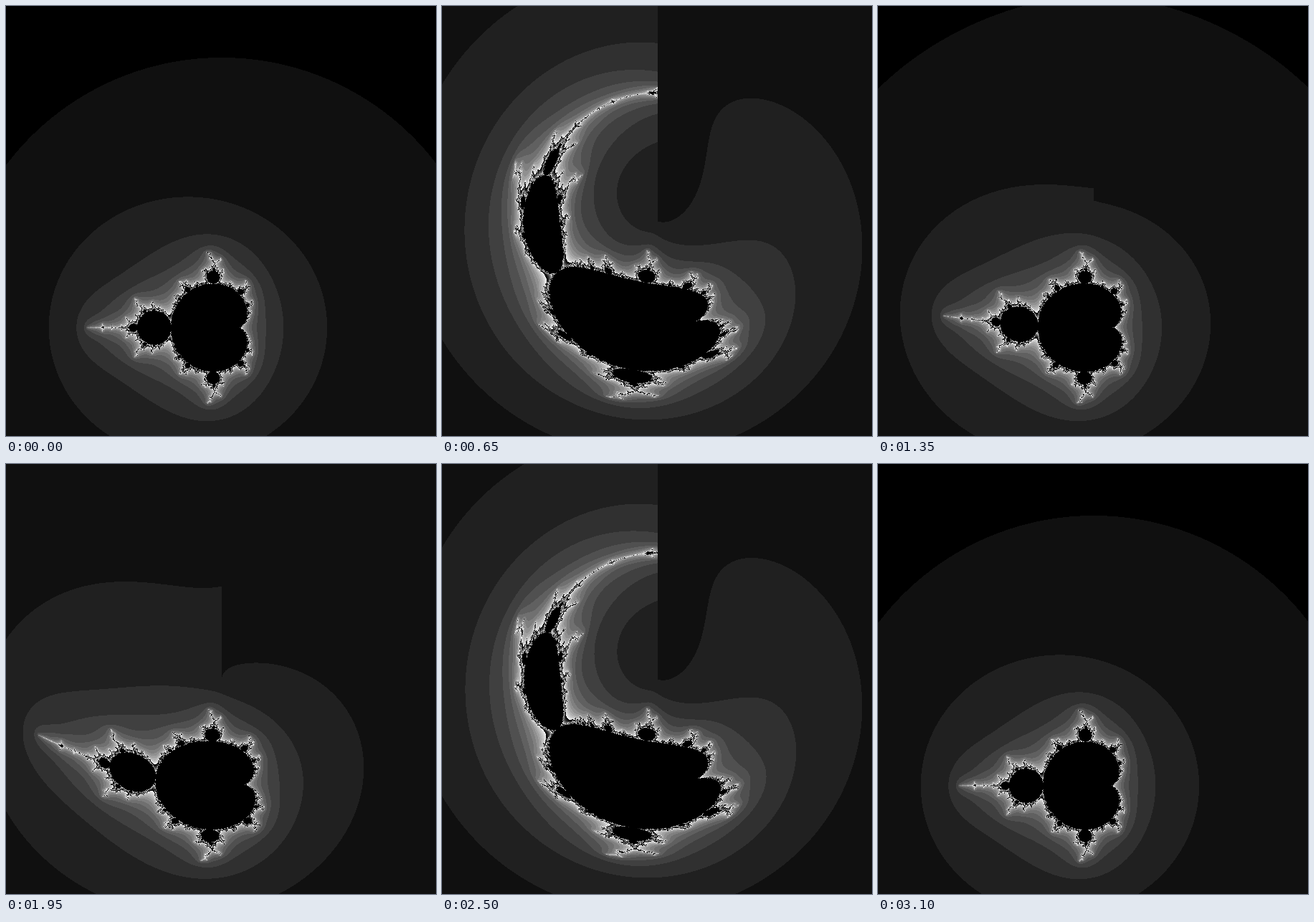
Write an HTML page with a canvas that moves like this. It is 600 px wide and 600 px high and loops after 3.15 s.

```html
<!DOCTYPE html>
<html lang="en">
<head>
<meta charset="utf-8">
<title>Mandelbrot set bending into polar coordinates</title>
<style>
  html, body { margin: 0; width: 100%; height: 100%; overflow: hidden; background: #000; }
  canvas { display: block; width: 600px; height: 600px; }
</style>
</head>
<body>
<canvas id="stage" width="600" height="600"></canvas>
<script>
const SIZE = 600;
const CX = 300.5, CY = 300;      // pole of the polar grid
const SCALE = 94.2;              // pixels per unit of the complex plane
const DROP = 148.3;              // real axis lies this far below the pole
const TURN = 58.2;               // pixels of arc length per radian
const LIMIT = 256, BAILOUT = 16; // iterations, squared escape radius
const STEP = 50, STEPS = 63, CYCLE = 31;
const HOLD = 2, RISE = 13.9, FALL = 15;

const ctx = document.getElementById('stage').getContext('2d');
const image = ctx.createImageData(SIZE, SIZE);
const pixels = new Uint32Array(image.data.buffer);

// Polar coordinates of each pixel; the angle is measured from straight down.
const radius = new Float32Array(SIZE * SIZE);
const angle = new Float32Array(SIZE * SIZE);
for (let y = 0, i = 0; y < SIZE; y++) {
  for (let x = 0; x < SIZE; x++, i++) {
    radius[i] = Math.hypot(x - CX, y - CY);
    angle[i] = Math.atan2(x - CX, y - CY);
  }
}

// Sixteen greys that repeat as the count grows.
const shades = Array.from({ length: LIMIT + 1 }, (_, k) => {
  const v = k * 16 % 256;
  return (0xff000000 | v << 16 | v << 8 | v) >>> 0;
});

// The main cardioid and the disc beside it never escape.
function inBody(a, b) {
  const bb = b * b, p = a - 0.25, q = p * p + bb;
  return q * (q + p) < bb / 4 || (a + 1) * (a + 1) + bb < 1 / 16;
}

function escapeCount(a, b) {
  if (inBody(a, b)) return LIMIT;
  let x = a, y = b, k = 0;
  while (k < LIMIT) {
    const xx = x * x, yy = y * y;
    if (xx + yy > BAILOUT) break;
    y = 2 * x * y + b;
    x = xx - yy + a;
    k++;
  }
  return k;
}

const easeInOut = x => x < 0.5 ? 2 * x * x : 1 - 2 * (1 - x) * (1 - x);

// 0 is the flat plane, 1 is fully polar.
function bendAt(step) {
  const n = step % CYCLE;
  const phase = Math.min((n - HOLD) / RISE, (CYCLE - n) / FALL, 1);
  return easeInOut(Math.max(0, phase));
}

function draw(bend) {
  const flat = 1 - bend;
  for (let y = 0, i = 0; y < SIZE; y++) {
    for (let x = 0; x < SIZE; x++, i++) {
      const u = flat * (x - CX) + bend * TURN * angle[i];
      const v = flat * (y - CY) + bend * radius[i];
      pixels[i] = shades[escapeCount(u / SCALE, (v - DROP) / SCALE)];
    }
  }
  ctx.putImageData(image, 0, 0);
}

const start = performance.now();
let shown = -1;

function tick() {
  const step = Math.floor((performance.now() - start) / STEP) % STEPS;
  const bend = bendAt(step % (STEPS - 1));
  if (bend !== shown) {
    draw(bend);
    shown = bend;
  }
  requestAnimationFrame(tick);
}
tick();
</script>
</body>
</html>
```
